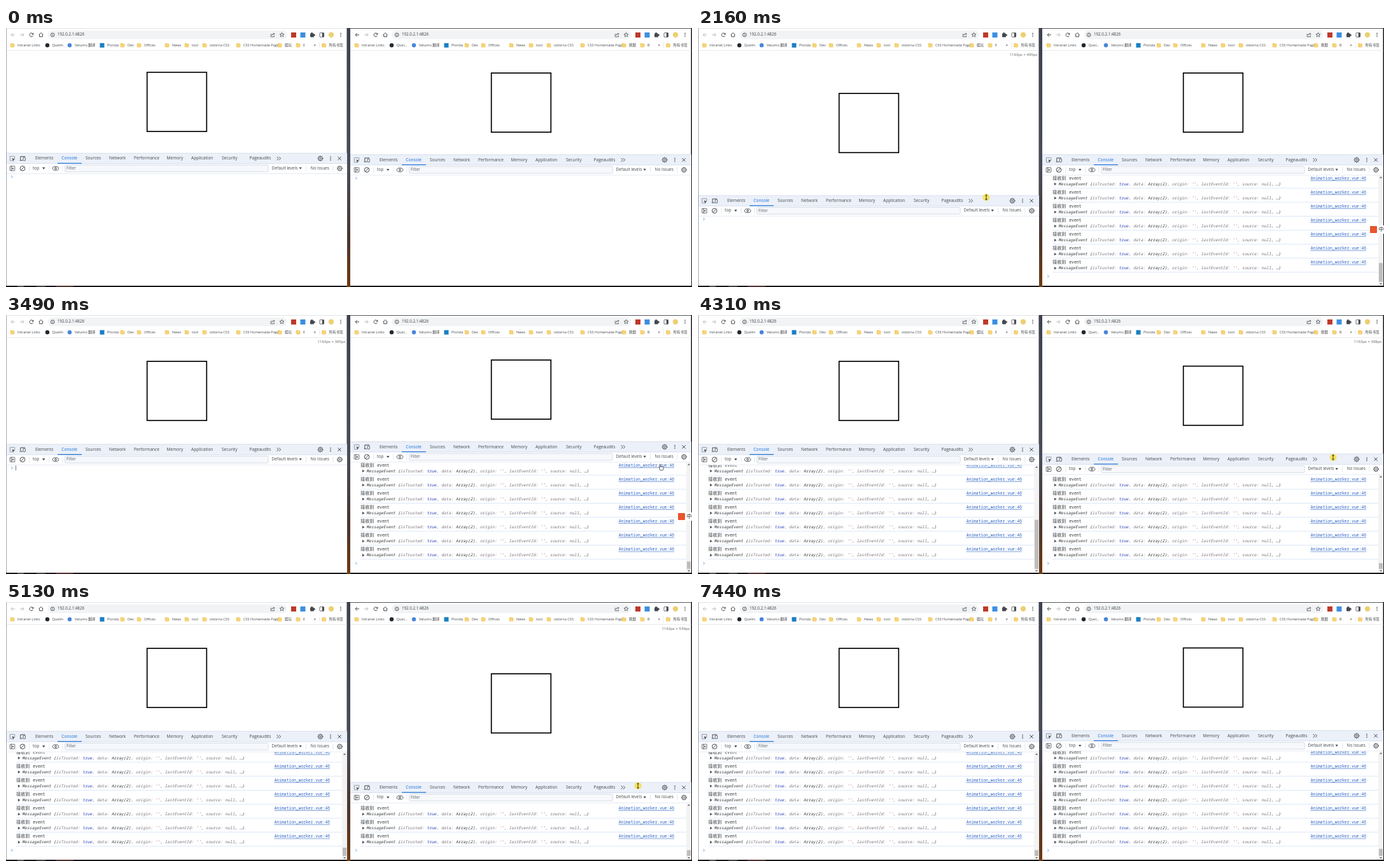
These frames come from a looping animation (1078x408 px, 7.72 s). An HTML page with a canvas:

```html
<!DOCTYPE html>
<html lang="zh">
<head>
<meta charset="utf-8">
<title>Two windows</title>
<style>
html, body { margin: 0; width: 100%; height: 100%; overflow: hidden; background: #fff; }
canvas { display: block; width: 1078px; height: 408px; }
</style>
</head>
<body>
<canvas id="stage"></canvas>
<script>
const W = 1078, H = 408, LOOP = 7720;
const PAGE_TOP = 35.5, FLOOR = 406, PX = 0.461;
const UI = '"Open Sans", "Noto Sans CJK SC", "Noto Sans CJK", sans-serif';
const MONO = '"Noto Sans Mono", "Liberation Mono", "Noto Sans CJK SC", "Noto Sans CJK", monospace';
const INK = '#45494e', BLUE = '#1a6fd4';

const canvas = document.getElementById('stage');
const dpr = window.devicePixelRatio || 1;
canvas.width = W * dpr;
canvas.height = H * dpr;
const c = canvas.getContext('2d');

// [time, value] keys, linear in between
const LEFT_TOP = [[1610, 197.2], [1700, 206], [2000, 246], [2360, 286], [2420, 286], [2650, 244], [2950, 212], [3170, 203.7]];
const RIGHT_TOP = [[4180, 199.5], [4400, 232], [4790, 303.5], [4940, 318], [4990, 318], [5450, 207], [5720, 207], [5800, 202.5]];
const LEFT_LOG = [[4170, 0], [4180, 1], [4790, 67], [4940, 80], [4990, 80], [5450, 120], [5720, 120], [5950, 130]];
const RIGHT_LOG = [[1600, 0], [1610, 1], [1700, 6.4], [2360, 58], [2420, 58], [2650, 77], [3170, 109]];
const POINT_X = [[120, 800], [720, 440], [860, 440], [1420, 453], [3220, 453], [3490, 1028], [3700, 1024], [3940, 998], [4940, 998], [5450, 985], [6190, 985], [6500, 505], [6810, 548]];
const POINT_Y = [[120, 330], [720, 260], [860, 260], [1420, 203], [3220, 206], [3490, 239], [3700, 256], [3940, 205], [6190, 212], [6500, 290], [6810, 357]];

function track(keys, t) {
  if (t <= keys[0][0]) return keys[0][1];
  for (let i = 1; i < keys.length; i++) {
    const [t0, a] = keys[i - 1], [t1, b] = keys[i];
    if (t <= t1) return a + (b - a) * (t - t0) / (t1 - t0);
  }
  return keys[keys.length - 1][1];
}

function rect(x, y, w, h, color) {
  c.fillStyle = color;
  c.fillRect(x, y, w, h);
}

function pill(x, y, w, h, r, fill, edge) {
  c.beginPath();
  c.roundRect(x, y, w, h, r);
  if (fill) { c.fillStyle = fill; c.fill(); }
  if (edge) { c.strokeStyle = edge; c.lineWidth = 0.8; c.stroke(); }
}

function disc(x, y, r, color) {
  c.beginPath();
  c.arc(x, y, r, 0, 7);
  c.fillStyle = color;
  c.fill();
}

function ring(x, y, r, color = INK, w = 1) {
  c.beginPath();
  c.arc(x, y, r, 0, 7);
  c.strokeStyle = color;
  c.lineWidth = w;
  c.stroke();
}

// each argument is a flat polyline: x, y, x, y ...
function lines(color, w, ...paths) {
  c.strokeStyle = color;
  c.lineWidth = w;
  c.beginPath();
  for (const p of paths)
    for (let i = 0; i < p.length; i += 2) i ? c.lineTo(p[i], p[i + 1]) : c.moveTo(p[i], p[i + 1]);
  c.stroke();
}

function shape(fill, ...p) {
  c.beginPath();
  for (let i = 0; i < p.length; i += 2) c.lineTo(p[i], p[i + 1]);
  c.closePath();
  c.fillStyle = fill;
  c.fill();
}

function text(s, x, y, size = 6.6, color = INK, font = UI, style = '') {
  c.font = `${style} ${size}px ${font}`;
  c.fillStyle = color;
  c.fillText(s, x, y);
}

function dots(x, y) {
  for (const d of [-2.4, 0, 2.4]) disc(x, y + d, 0.8, INK);
}

function gear(x, y) {
  ring(x, y, 3.2, INK, 1);
  ring(x, y, 1.2, INK, 0.8);
  c.setLineDash([1.2, 1.7]);
  ring(x, y, 4, INK, 1);
  c.setLineDash([]);
}

function folder(x, y) {
  pill(x - 2.8, y - 3, 3, 2, 0.6, '#e9b93c');
  pill(x - 2.8, y - 2.2, 5.8, 5, 0.6, '#f7d677', '#ecc257');
}

function browserBar(right) {
  const y = 10.8;
  const back = right ? INK : '#b9bcc0';
  lines(back, 1, [14, y, 8, y], [10.7, y - 2.8, 8, y, 10.7, y + 2.8]);
  lines('#b9bcc0', 1, [22, y, 28, y], [25.3, y - 2.8, 28, y, 25.3, y + 2.8]);
  c.beginPath();
  c.arc(40, y, 2.9, 0.5, 5.6);
  c.strokeStyle = INK;
  c.lineWidth = 1;
  c.stroke();
  shape(INK, 43.4, y - 3.4, 43.4, y - 0.4, 40.4, y - 0.4);
  lines(INK, 1, [51.5, y, 55, y - 3.2, 58.5, y], [52.7, y - 0.6, 52.7, y + 3, 57.3, y + 3, 57.3, y - 0.6]);
  pill(65.5, 4, 376, 13.4, 6.7, '#f1f3f4');
  ring(73.2, y, 2.9, INK, 0.9);
  lines(INK, 0.9, [73.2, y - 0.5, 73.2, y + 1.6], [73.2, y - 1.8, 73.2, y - 1.1]);
  text('192.0.2.1:4826', 81, 10.6, 6.2, '#3c4043');
  lines(INK, 0.8, [417.5, y - 1, 416.2, y - 1, 416.2, y + 3, 421.5, y + 3, 421.5, y + 1], [418, y + 1, 419, y - 1.5, 422, y - 1.5], [420.5, y - 3, 422, y - 1.5, 420.5, y]);
  const star = [];
  for (let i = 0; i <= 10; i++) {
    const a = i * Math.PI / 5 - Math.PI / 2, r = i % 2 ? 1.6 : 3.6;
    star.push(433.5 + r * Math.cos(a), y + r * Math.sin(a));
  }
  lines(INK, 0.8, star);
  rect(448, 7, 8, 8, '#bd3a2b');
  rect(462.5, 7, 8, 8, '#3d8fe0');
  pill(478, 8.5, 6, 6, 1, INK);
  disc(480.6, 8.4, 1.4, INK);
  disc(484.4, 11.2, 1.4, INK);
  pill(493, 7.6, 6.6, 6.6, 0.8, null, INK);
  rect(496.8, 7.6, 2.8, 6.6, INK);
  disc(511, y, 4.2, '#edcf72');
  dots(526, y);
}

function bookmarks(right) {
  const y = 27.2;
  const items = [
    [10, 'Intranet Links'], [183, 'Dev'], [209, 'Offices'], [253, 'News'], [284, 'tool'],
    [312, 'vidorna CSS'], [365, 'CSS Homemade Page'], [430, right ? '刷题' : '娱玩'],
    [459, right ? 'B' : 'E'], [499.5, '所有书签']
  ];
  for (const [x, s] of items) {
    folder(x, y);
    text(s, x + 8, y, 5.6);
  }
  disc(65, y, 3.2, '#22282f');
  text(right ? 'Quel...' : 'Quelm', 72.5, y, 5.6);
  disc(100, y, 3.2, '#4a84dc');
  text('Velumo 翻译', 108, y, 5.6);
  rect(147.5, y - 3.4, 7, 7, '#1a7fc4');
  text('Plonda', 159, y, 5.6);
  text('»', 483.5, y - 0.4, 7);
  rect(492, 23, 0.6, 8, '#dde1e6');
  rect(0, 35, 536, 0.7, '#dfe2e6');
}

function devBars(top) {
  const y = top + 8.3, z = top + 24;
  rect(0, top, 536, FLOOR - top, '#fff');
  rect(0, top, 536, 16.5, '#ebf0f9');
  rect(0, top - 0.4, 536, 0.8, '#d5dbe6');
  rect(0, top + 16, 536, 0.8, '#d3dded');
  rect(0, top + 32, 536, 0.7, '#d9e1ee');

  c.setLineDash([1.4, 1]);
  lines(INK, 0.9, [12, y + 3.6, 6.4, y + 3.6, 6.4, y - 3.4, 13.6, y - 3.4, 13.6, y]);
  c.setLineDash([]);
  shape(INK, 9.4, y - 0.6, 14.4, y + 1.2, 12.2, y + 2, 11.4, y + 4.4);
  lines(INK, 1, [30, y - 3, 22.8, y - 3, 22.8, y + 2.4], [21.6, y + 3, 26, y + 3]);
  pill(27, y - 1.6, 3.4, 5, 0.5, null, INK);

  const tabs = [[46, 'Elements'], [125, 'Sources'], [162, 'Network'], [201, 'Performance'],
    [252.5, 'Memory'], [291, 'Application'], [339, 'Security'], [382.5, 'Pageaudits']];
  for (const [x, s] of tabs) text(s, x, y);
  text('Console', 87.3, y, 6.6, BLUE);
  rect(81, top + 15.4, 38, 1.2, BLUE);
  lines(INK, 0.9, [425.6, y - 2.8, 428.2, y, 425.6, y + 2.8], [429, y - 2.8, 431.6, y, 429, y + 2.8]);
  gear(494, y);
  dots(510, y);
  lines(INK, 1, [521.4, y - 2.7, 526.8, y + 2.7], [526.8, y - 2.7, 521.4, y + 2.7]);

  pill(6.2, z - 3.6, 7.6, 7.2, 0.6, null, INK);
  lines(INK, 0.9, [8.6, z - 3.6, 8.6, z + 3.6]);
  shape(INK, 10, z - 1.8, 12.4, z, 10, z + 1.8);
  ring(26, z, 3.8);
  lines(INK, 1, [28.6, z - 2.6, 23.4, z + 2.6]);
  text('top', 42, z - 0.2);
  shape(INK, 57, z - 1.6, 61.4, z - 1.6, 59.2, z + 1.6);
  c.beginPath();
  c.ellipse(78, z, 4.8, 3, 0, 0, 7);
  c.strokeStyle = INK;
  c.lineWidth = 0.9;
  c.stroke();
  ring(78, z, 1.4);
  pill(92.6, z - 5.4, 319.6, 10.8, 2, '#f6f8fc', '#ccd3df');
  text('Filter', 95, z, 6.4, '#5f6368');
  text('Default levels', 417.6, z - 0.2, 6.5);
  shape(INK, 460.6, z - 1.8, 464.8, z - 1.8, 462.7, z + 1.4);
  text('No Issues', 478.6, z - 0.2, 6.5);
  gear(524.4, z);
  for (const x of [36.5, 67.5, 88.5, 471, 513.5]) rect(x, z - 4.5, 0.7, 9, '#d3dbe8');
}

const EVENT = [
  ['MessageEvent {', '#33373c'], ['isTrusted: ', '#77707c'], ['true', '#2a3fb8'], [', data: ', '#77707c'],
  ['Array(2)', '#33373c'], [', origin: ', '#77707c'], ["''", '#b8352c'], [', lastEventId: ', '#77707c'],
  ["''", '#b8352c'], [', source: ', '#77707c'], ['null', '#77707c'], [', …}', '#44484d']
];

function eventText(x, y) {
  shape('#4f5358', x - 6.4, y - 2.3, x - 2.8, y, x - 6.4, y + 2.3);
  for (const [s, color] of EVENT) {
    text(s, x, y, 6.34, color, MONO, 'italic');
    x += c.measureText(s).width;
  }
}

function logHead(y, end) {
  text('接收到', 16.3, y, 7, '#33373c', MONO);
  text('event', 42.3, y, 6.34, '#33373c', MONO);
  const name = 'Animation_worker.vue:46';
  c.textAlign = 'right';
  text(name, end, y, 6.34, '#2a62c4', MONO);
  c.textAlign = 'left';
  rect(end - 87.5, y + 3.2, 87.5, 0.6, '#2a62c4');
}

function prompt(y) {
  lines('#4a8ee0', 0.9, [8.2, y - 2, 10.2, y, 8.2, y + 2]);
}

function consoleLog(top, count, caret) {
  const n = Math.floor(count), first = top + 39.8, head = top + 32.7;
  c.save();
  c.beginPath();
  c.rect(0, head, 536, FLOOR - head);
  c.clip();
  if (n < 11) {
    for (let i = 0; i < n; i++) {
      const y = first + i * 13.8;
      logHead(y, 517);
      eventText(74, y);
      rect(16, y + 6.9, 514, 0.7, '#dbe6f8');
    }
    prompt(n ? first + n * 13.8 - 0.6 : top + 37);
  } else {
    for (let y = 369.4, i = 0; i < n && y > head - 12; y -= 22.1, i++) {
      logHead(y, 509);
      eventText(25.3, y + 9);
      rect(16, y + 15, 512, 0.7, '#cfdef6');
    }
    prompt(391.3);
    const view = FLOOR - head;
    const thumb = Math.max(9, (view - 12) * view / (n * 22.1 + 14));
    rect(528, head, 8, view, '#f3f3f3');
    rect(529, 400 - thumb, 6, thumb, '#bdbdbd');
    shape('#6a6a6a', 530, head + 4.4, 534, head + 4.4, 532, head + 1.8);
    shape('#6a6a6a', 530, 402, 534, 402, 532, 404.6);
  }
  if (caret) rect(15, top + 33.5, 0.8, 7.5, '#555');
  c.restore();
}

function pane(x, top, count, right, sized, caret) {
  c.save();
  c.translate(x, 0);
  rect(0, 0, 535.5, FLOOR, '#fff');
  browserBar(right);
  bookmarks(right);
  c.strokeStyle = '#000';
  c.lineWidth = 1.7;
  c.strokeRect(221.7, (PAGE_TOP + top) / 2 - 46.6, 93.6, 93.2);
  if (sized) {
    c.textAlign = 'right';
    text(`1163px × ${Math.round((top - PAGE_TOP) / PX)}px`, 533.5, 42, 6, '#5b5f63');
    c.textAlign = 'left';
  }
  devBars(top);
  consoleLog(top, count, caret);
  c.restore();
}

function desktop() {
  rect(0, 0, W, H, '#17151a');
  const g = c.createLinearGradient(0, 0, 0, H);
  g.addColorStop(0, '#3d4250');
  g.addColorStop(0.55, '#4a4d5a');
  g.addColorStop(0.8, '#49362f');
  g.addColorStop(1, '#703a12');
  rect(535.5, 0, 6, H, g);
  rect(18, 406.6, 10, 1, '#8d8d8d');
  rect(48, 406.6, 14, 1, '#74695f');
  rect(78, 406.6, 28, 1, '#8a4a42');
}

function edges() {
  rect(0, 0, 0.8, FLOOR, '#8d9096');
  rect(0, 0, 535, 0.7, '#d3d6db');
  rect(541, 0, 537, 0.8, '#26282d');
}

function imeBadge() {
  rect(1055, 311, 23, 13, '#fff');
  pill(1056, 312, 11, 11, 1, '#e8552d');
  text('中', 1069.5, 317.6, 8, '#222');
}

function pointer(t, leftTop, rightTop) {
  if (t < 120 || t >= 7440) return;
  const x = track(POINT_X, t);
  let y = track(POINT_Y, t);
  const dragLeft = t >= 1560 && t < 3200, dragRight = t >= 4140 && t < 6190;
  if (dragLeft) y = leftTop + 2.8;
  if (dragRight) y = rightTop + (t < 5200 ? 5.5 : 9);
  const resize = dragLeft || dragRight || (t > 1380 && t < 1560) || (t > 3900 && t < 4140);
  if (dragLeft || dragRight) disc(x, y, 5.6, 'rgba(246, 222, 70, 0.8)');
  if (resize) {
    lines('#5d5214', 1.2, [x, y - 3.5, x, y + 3.5]);
    shape('#5d5214', x - 2, y - 2.4, x, y - 5, x + 2, y - 2.4);
    shape('#5d5214', x - 2, y + 2.4, x, y + 5, x + 2, y + 2.4);
  } else if (t > 3440 && t < 3560) {
    pill(x - 1, y - 4, 2, 6, 1, '#fff', '#333');
    pill(x - 1, y, 6, 5.4, 1.4, '#fff', '#333');
  } else {
    const p = [x, y, x, y + 9, x + 2.1, y + 7.2, x + 3.5, y + 10, x + 4.8, y + 9.4, x + 3.5, y + 6.6, x + 6.2, y + 6.4, x, y];
    shape('#fff', ...p);
    lines('#222', 0.8, p);
  }
}

function draw(t) {
  c.setTransform(dpr, 0, 0, dpr, 0, 0);
  c.textBaseline = 'middle';
  c.textAlign = 'left';
  const leftTop = track(LEFT_TOP, t), rightTop = track(RIGHT_TOP, t);
  const caret = (t >= 900 && t < 1400) || (t >= 3240 && t < 3760);
  desktop();
  pane(0, leftTop, track(LEFT_LOG, t), false, t >= 1610 && t < 4040, caret);
  pane(541, rightTop, track(RIGHT_LOG, t), true, t >= 4180 && t < 6190, false);
  edges();
  if (t >= 120 && t < 4040) imeBadge();
  pointer(t, leftTop, rightTop);
}

const start = performance.now();
function tick() {
  draw((performance.now() - start) % LOOP);
  requestAnimationFrame(tick);
}
tick();
</script>
</body>
</html>
```
